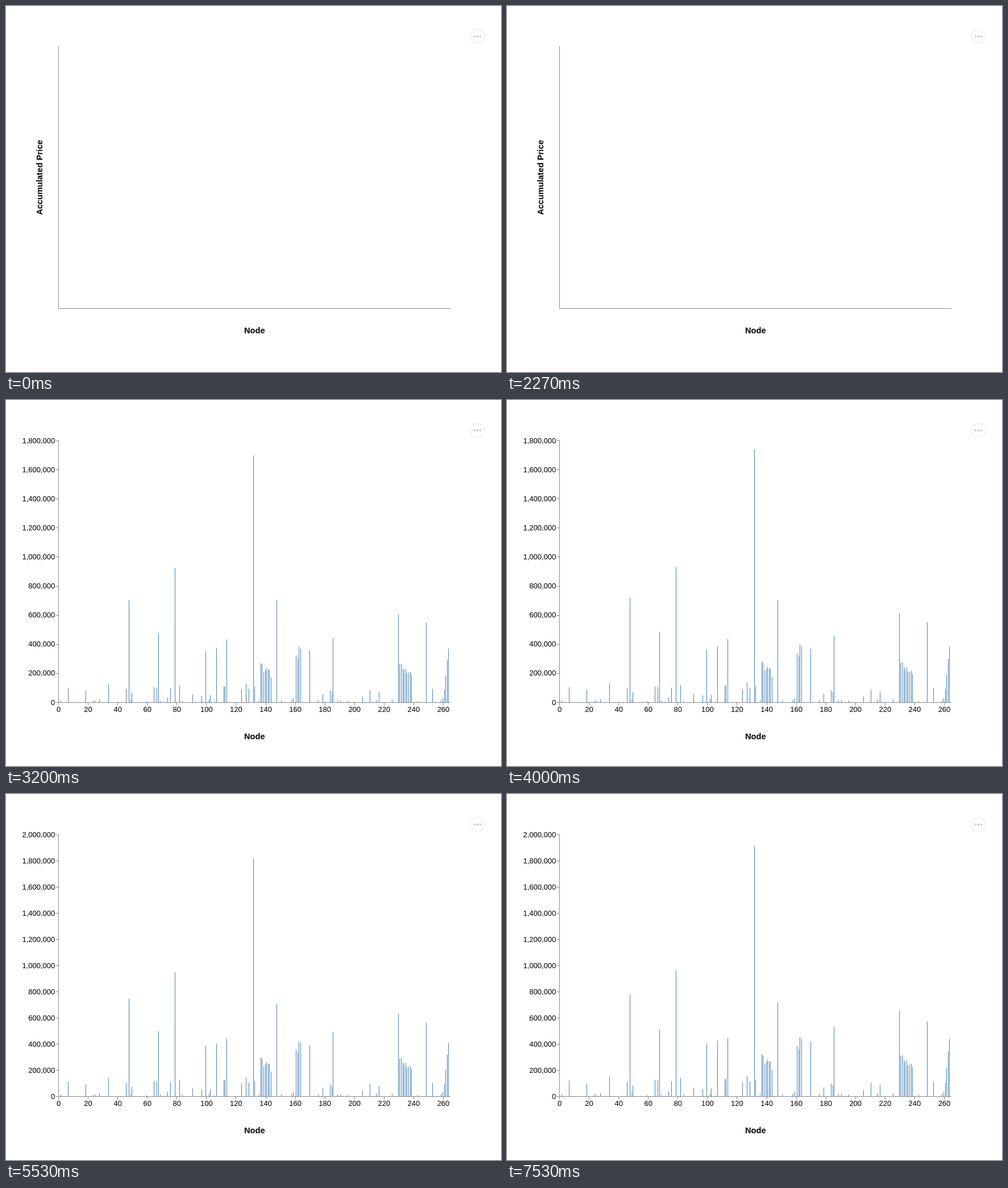
These frames come from a looping animation (871 by 643 pixels, 8000 ms). An HTML page:

```html
<!DOCTYPE html>
<html lang="en">
<head>
<meta charset="utf-8">
<title>Accumulated price by node</title>
<style>
  html, body { margin: 0; width: 100%; height: 100%; overflow: hidden; background: #fff; }
  svg { display: block; width: 871px; height: 643px; font: 13px "Liberation Sans", Arial, sans-serif; }
  .title { font-size: 14.65px; font-weight: bold; text-anchor: middle; }
  .axis { stroke: #888; fill: none; }
  .bars { stroke: #4682b4; fill: none; }
</style>
</head>
<body>
<svg viewBox="0 0 871 643">
  <g id="chart"></g>
  <path class="axis" d="M92.5 71V531.5H782"/>
  <circle cx="829.5" cy="53.5" r="12.5" fill="#fff" stroke="#ebebeb" stroke-width="1.3"/>
  <path d="M824.6 53.5h0m4.9 0h0m4.9 0h0" stroke="#c4c4c4" stroke-width="3.4" stroke-linecap="round"/>
</svg>
<script>
const LOOP = 8000, LEFT = 92.5, BOTTOM = 531.5, HEIGHT = 460;
const LAST_NODE = 265, NODE_STEP = 690 / LAST_NODE;
const UPDATES = [2670, 2870, 3200, 4000, 4800, 5530, 6600, 7530];

// Prices are in thousands. Tall bars: [node, first price, last price].
const peaks = [
  [48, 694, 780], [68, 473, 515], [79, 920, 964], [100, 345, 409],
  [107, 368, 428], [114, 433, 446], [132, 1667, 1913], [148, 700, 717],
  [170, 348, 417], [186, 427, 531], [230, 597, 656], [249, 544, 574]
];
// Groups of neighbouring bars whose height follows a ramp.
const clusters = [
  { from: 137, to: 144, start: 240, end: 190 },
  { from: 161, to: 164, start: 310, end: 400 },
  { from: 231, to: 239, start: 250, end: 190 },
  { from: 260, to: 264, start: 28, end: 320 }
];

const mix = (a, b, share) => a + (b - a) * share;
const noise = seed => {
  const value = Math.sin(seed * 12.9898) * 43758.5453;
  return value - Math.floor(value);
};

function makeBar(node) {
  const peak = peaks.find(([peakNode]) => peakNode === node);
  if (peak) return { node, first: peak[1], last: peak[2] };
  const cluster = clusters.find(({ from, to }) => node >= from && node <= to);
  if (cluster) {
    const { from, to, start, end } = cluster;
    const first = mix(start, end, (node - from) / (to - from)) * mix(.85, 1.15, noise(node));
    return { node, first, last: first * 1.22 };
  }
  const first = noise(node) < .35 ? 130 * noise(node + .5) ** 3 : 0;
  return { node, first, last: first * 1.25 };
}
const bars = Array.from({ length: LAST_NODE }, (_, i) => makeBar(i + 1));

const chart = document.getElementById("chart");
const label = (x, y, text, anchor) => `<text x="${x}" y="${y}" text-anchor="${anchor}">${text}</text>`;
const nodeTitle = y => `<text class="title" x="437.3" y="${y}">Node</text>`;
const snap = position => Math.floor(position) + .5;

function emptyChart() {
  return nodeTitle(575.2) +
    '<text class="title" transform="translate(64.2 301.2) rotate(-90)">Accumulated Price</text>';
}

function filledChart(time) {
  const start = UPDATES[0], end = UPDATES[UPDATES.length - 1];
  const share = ((time - start) / (end - start)) ** .92;
  const prices = bars.map(({ first, last }) => mix(first, last, share));
  const max = Math.ceil(Math.max(...prices) / 200) * 200;
  const yOf = price => BOTTOM - price / max * HEIGHT;
  let labels = "", ticks = "", barPath = "";
  for (let price = 0; price <= max; price += 200) {
    const y = yOf(price);
    ticks += `M${LEFT - 5} ${snap(y)}h5`;
    labels += label(86.3, y + 4.1, (price * 1000).toLocaleString("en-US"), "end");
  }
  for (let node = 0; node <= LAST_NODE; node += 20) {
    const x = LEFT + node * NODE_STEP;
    ticks += `M${snap(x)} ${BOTTOM}v5`;
    labels += label(x, 548, node, "middle");
  }
  bars.forEach(({ node }, i) => {
    barPath += `M${snap(LEFT - 1 + node * NODE_STEP)} ${BOTTOM}V${yOf(prices[i])}`;
  });
  return `<path class="bars" d="${barPath}"/><path class="axis" d="${ticks}"/>` + labels + nodeTitle(595.5);
}

let shown;
function draw() {
  const time = performance.now() % LOOP;
  const update = UPDATES.filter(at => at <= time).pop() || 0;
  if (update !== shown) {
    chart.innerHTML = update ? filledChart(update) : emptyChart();
    shown = update;
  }
  requestAnimationFrame(draw);
}
draw();
</script>
</body>
</html>
```
